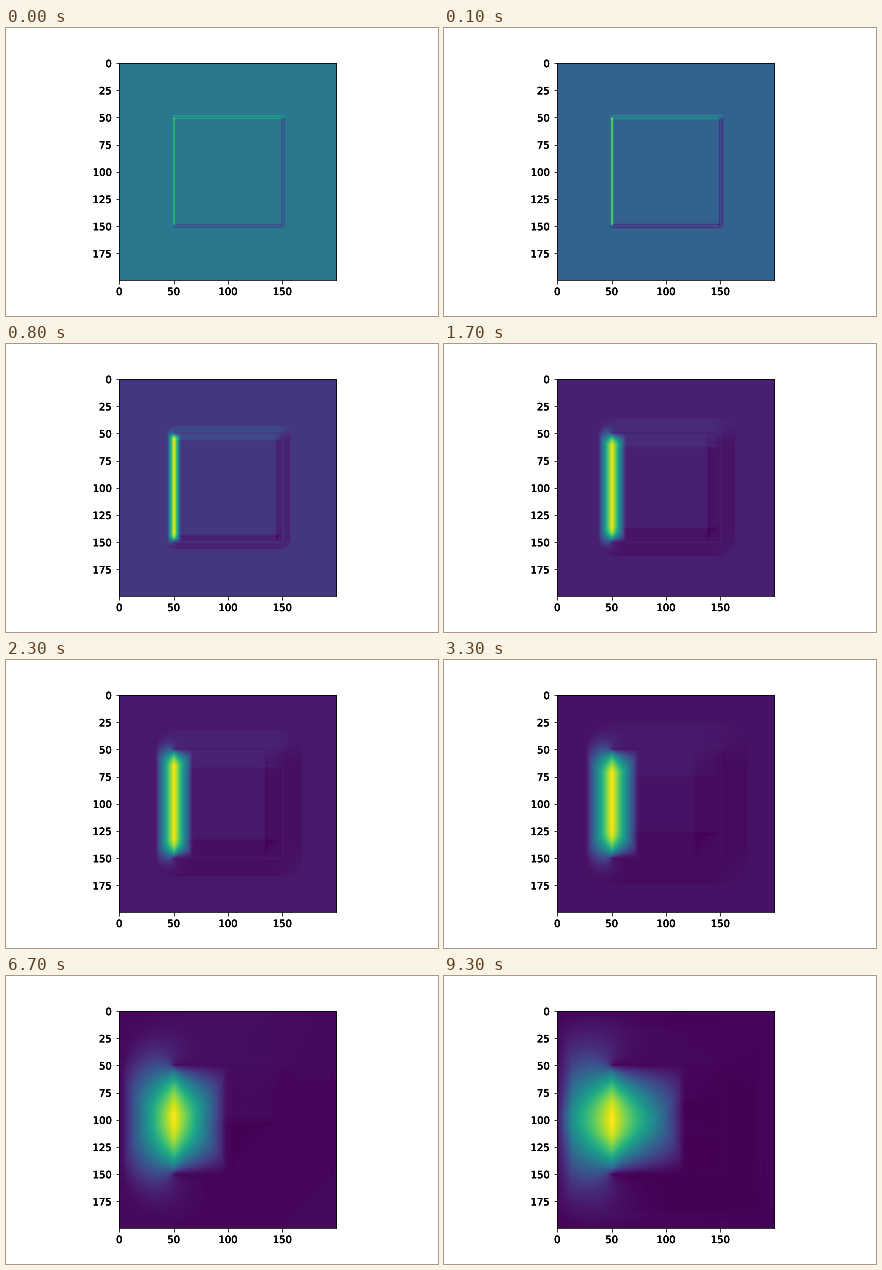
A matplotlib script for the animation above (10000 ms loop, 432x288 px).

```python
import numpy as np
import matplotlib.pyplot as plt
from matplotlib.animation import FuncAnimation
from matplotlib.patheffects import Normal

SIZE, LOW, HIGH = 200, 50, 150
FRAMES, INTERVAL = 100, 100
COURANT_SQ = 0.5

# Three sides of the square are held at a level, the left one is a steady source.
level = np.zeros((SIZE, SIZE))
level[LOW:HIGH + 1, HIGH] = -1
level[HIGH, LOW:HIGH + 1] = -1
level[LOW, LOW:HIGH + 1] = 1
walls = level != 0

source = np.zeros((SIZE, SIZE))
source[LOW + 1:HIGH, LOW] = 2


def laplacian(u):
    p = np.pad(u, 1)
    return p[2:, 1:-1] + p[:-2, 1:-1] + p[1:-1, 2:] + p[1:-1, :-2] - 4 * u


def simulate():
    """Leapfrog wave equation; returns one field per frame."""
    previous, current = np.zeros_like(level), level.copy()
    fields = []
    for step in range(FRAMES):
        strength = 0.5 if step == 0 else 1
        following = (2 * current - previous + COURANT_SQ * laplacian(current)
                     + strength * source)
        following[walls] = level[walls]
        previous, current = current, following
        fields.append(np.where(walls, 0, current))
    return fields


fields = simulate()

plt.rcParams.update({"font.family": "DejaVu Sans", "font.size": 10})
fig = plt.figure(figsize=(6, 4), dpi=72, facecolor="white")
ax = fig.add_axes([0.125, 0.125, 0.775, 0.755])
image = ax.imshow(fields[0], cmap="viridis")
ax.set_xticks(range(0, SIZE, 50))
ax.set_yticks(range(0, SIZE, 25))
for label in ax.get_xticklabels() + ax.get_yticklabels():
    label.set_path_effects([Normal()] * 4)  # denser antialiased edges


def update(frame):
    field = fields[frame]
    image.set_data(field)
    image.set_clim(field.min(), field.max())
    return [image]


anim = FuncAnimation(fig, update, frames=FRAMES, interval=INTERVAL,
                     repeat=True, repeat_delay=0)
plt.show()
```
